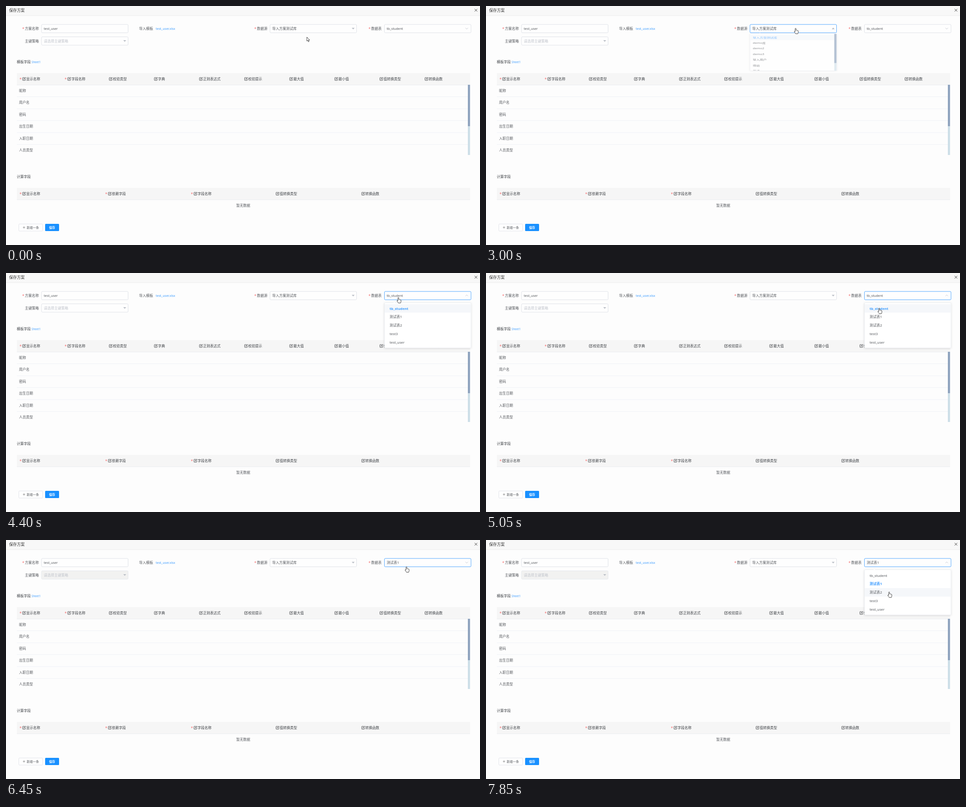
Recreate the animation shown at these times as an HTML page. Size 1054x531 px, loop 8000 ms.

```html
<!DOCTYPE html>
<html lang="zh-CN">
<head>
<meta charset="utf-8">
<style>
  html, body { margin: 0; width: 100%; height: 100%; overflow: hidden; background: #fdfdfd; }
  svg { display: block; width: 100vw; height: 100vh; }
  text { font-family: "Noto Sans", "Noto Sans CJK SC", "Noto Sans CJK", sans-serif; white-space: pre; }
</style>
</head>
<body>
<svg id="stage" viewBox="0 0 1054 531"></svg>
<script>
const LOOP = 8000, BLUE = '#409eff', INK = '#55585d', LINE = '#dcdfe6', MUTED = '#c0c4cc';
const OPEN_SOURCE = 2120, CLOSE_SOURCE = 2977, OPEN_TABLE = 3650, PICK = 5600, REOPEN = 7000;
const ROW = 18.8, POPPER_Y = 66;

// Markup helpers
const text = (x, y, s, { size = 7.75, fill = INK, weight = 400, anchor = 'start', id = '' } = {}) =>
  `<text ${id && `id="${id}"`} x="${x}" y="${y + 2.8}" font-size="${size}" fill="${fill}" font-weight="${weight}" text-anchor="${anchor}">${s}</text>`;
const rect = (x, y, w, h, fill, extra = '') =>
  `<rect x="${x}" y="${y}" width="${w}" height="${h}" fill="${fill}" ${extra}/>`;
const star = (x, y) => text(x, y + 1, '*', { size: 8.5, fill: '#f56c6c' });
const label = (x, y, s, required) => (required ? star(x - 6, y) : '') + text(x, y, s);
const box = (id, x, y) => rect(x, y, 192.5, 18.5, '#fefefe', `id="${id}" rx="2" stroke="${LINE}" stroke-width=".9"`);
const caret = (id, x, y) =>
  `<g transform="translate(${x} ${y})"><path id="${id}" d="M-3.2-1.6H3.2L0 1.9Z" fill="#b9bdc5"/></g>`;
const pencil = (x, y) =>
  `<path transform="translate(${x} ${y})" fill="none" stroke="#404246" stroke-width=".9"
    d="M4.5-3H1.2Q.5-3 .5-2.3V2.6Q.5 3.3 1.2 3.3H6Q6.7 3.3 6.7 2.6V0M3 1L3.3-.5 6.6-3.6 7.5-2.7 4.3.6Z"/>`;

function tableHead(y, step, required, names) {
  return rect(24, y - 13, 1008, 26.4, '#f6f6f6') + rect(24, y + 13, 1008, .7, '#e6e8ee') +
    names.map((name, i) => {
      const starred = i < required, x = 28.5 + step * i + (starred ? 8 : 0);
      return (starred ? star(x - 6.5, y) : '') + pencil(x, y) +
        text(x + 8.6, y, name, { fill: '#3d4045', weight: 500 });
    }).join('');
}

function popper(id, x, height, pad, items, scroll) {
  return `<g id="${id}"><g transform="translate(${x} 0)">
    ${rect(0, 0, 192.5, height, '#fff', 'rx="2" stroke="#e4e7ed" stroke-width=".7" filter="url(#shadow)"')}
    <path d="M18.5 .2L22-3 25.5 .2" fill="#fff" stroke="#e4e7ed" stroke-width=".6"/>
    <svg y="2" width="192.5" height="${height - 3}">
      <g transform="translate(0 -2)">
      ${rect(.4, 3.3, 191.7, ROW, '#f5f7fa', 'class="hover"')}
      ${items.map((s, i) => text(pad, 3.3 + ROW * (i + .5), s)).join('')}</g>
    </svg>
    ${scroll ? rect(187.5, 1, 4.8, height - 1, '#d3e2ea') + rect(187.5, 1, 4.8, 98, '#90a4bf') : ''}
  </g></g>`;
}

const fields = ['昵称', '用户名', '密码', '出生日期', '入职日期', '人员类型'];
const tables = ['tb_student', '测试表1', '测试表2', 'test3', 'test_user'];
const sources = ['导入方案测试库', 'demo库', 'demo2', 'demo3', '导入用户', '场站', '普通', '测试'];

stage.innerHTML = `
  <defs><filter id="shadow" x="-10%" y="-10%" width="120%" height="125%">
    <feDropShadow dx="0" dy="1" stdDeviation="2.5" flood-color="#000" flood-opacity=".12"/></filter></defs>
  ${rect(0, 0, 1054, 531, '#fdfdfd')}
  ${rect(0, 0, 1054, 21, '#f8f8f8')}${rect(0, 21, 1054, .8, '#e9e9e9')}
  ${text(7, 10, '保存方案', { size: 8.6, fill: '#333' })}
  <path d="M1042 6.3l6 6m0-6l-6 6" stroke="#444" fill="none"/>

  ${label(42, 50, '方案名称', true)}${box('name', 79, 41)}${text(84, 50, 'test_user', { size: 7.24 })}
  ${label(42, 78, '主键策略')}${box('strategy', 79, 68.5)}
  ${text(84, 78, '请选择主键策略', { fill: MUTED })}${caret('strategyCaret', 264, 77.5)}
  ${label(296, 50, '导入模板')}${text(333, 50, 'test_user.xlsx', { size: 7, fill: BLUE })}
  ${label(558, 50, '数据源', true)}${box('source', 587, 41)}
  ${text(592, 50, '导入方案测试库')}${caret('sourceCaret', 772, 50)}
  ${label(812, 50, '数据表', true)}${box('table', 841.5, 41)}
  ${text(846.5, 50, '', { id: 'tableValue' })}
  <g transform="translate(1024.5 50)"><path id="tableCaret" d="M-2.8-1.4L0 1.4 2.8-1.4" fill="none" stroke="${MUTED}" stroke-width=".9"/></g>

  ${text(24, 124, '模板字段', { fill: '#3d4045' })}${text(57, 124, 'Sheet1', { size: 6.2, fill: BLUE })}
  ${tableHead(162, 100.3, 2, ['显示名称', '字段名称', '校验类型', '字典', '正则表达式', '校验提示', '最大值', '最小值', '值转换类型', '转换函数'])}
  ${fields.map((s, i) => text(29, 188 + 26.5 * i, s) +
    (i < 5 ? rect(24, 201.3 + 26.5 * i, 1003, .8, '#ebeef5') : '')).join('')}
  ${rect(1027, 175, 4.8, 156, '#cddfe8')}${rect(1027, 175, 4.8, 92, '#90a4bf')}

  ${text(24, 379, '计算字段', { fill: '#3d4045' })}
  ${tableHead(417, 190.5, 3, ['显示名称', '依赖字段', '字段名称', '值转换类型', '转换函数'])}
  ${text(527.5, 443, '暂无数据', { anchor: 'middle' })}
  ${rect(28.5, 484.3, 53, 15.7, '#fefefe', `rx="1.5" stroke="${LINE}" stroke-width=".8"`)}
  <path d="M37.5 492h5m-2.5-2.5v5" stroke="#666" stroke-width=".7"/>
  ${text(46, 492, '新增一条', { size: 6.8 })}
  ${rect(87, 484, 31, 16, '#1890ff', 'rx="1.5"')}
  ${text(102.5, 492, '保存', { size: 6.8, fill: '#fff', weight: 700, anchor: 'middle' })}

  ${popper('sourceList', 587, 125, 6.3, sources, true)}
  ${popper('tableList', 841.5, 100.6, 11.5, tables, false)}
  <g id="cursor" fill="#fff" stroke="#222" stroke-width=".85" stroke-linejoin="round">
    <path id="arrow" d="M0 0V9L2 7.2 3.5 10.5 5 9.9 3.6 6.6H6.2Z"/>
    <path id="hand" d="M-1.1 7.5V.9Q-1.1 0 0 0T1 .9V4.3Q2 3.7 2.8 4.6 3.8 4.1 4.4 5.1 5.8 4.8 5.8 6.2V8.6Q5.8 10 4.8 12.2H0Q-.8 10.4-3 8.1-3.4 6.6-2.1 6.7Z"/>
  </g>`;

const $ = id => document.getElementById(id);
const set = (el, attrs) => { for (const k in attrs) el.setAttribute(k, attrs[k]); };
const clamp = v => Math.max(0, Math.min(1, v));
const smooth = v => v * v * (3 - 2 * v);
const quint = v => 1 - (1 - v) ** 5;

// Pointer stops: time, x, y
const stops = [
  [0, 669, 69], [50, 669, 69], [450, 687, 52], [1100, 687, 52], [1650, 688.5, 49.5],
  [3100, 688.5, 49.5], [3580, 872.5, 54.5], [4700, 872.5, 54.5], [5350, 876, 97],
  [5750, 876, 97], [6350, 890.5, 59.5], [6480, 890.5, 59.5], [6680, 894, 52],
  [7080, 894, 52], [7700, 896.5, 115.5], [LOOP, 896.5, 115.5]
];
function pointer(t) {
  const i = stops.findIndex(s => s[0] > t), [t0, x0, y0] = stops[i - 1], [t1, x1, y1] = stops[i];
  const k = smooth((t - t0) / (t1 - t0));
  return [x0 + (x1 - x0) * k, y0 + (y1 - y0) * k];
}

// Opening and closing state of a drop-down at time t
function fold(t, open, close) {
  const leaving = t >= close;
  const p = clamp((t - (leaving ? close : open)) / 300);
  return {
    leaving,
    scale: leaving ? 1 - quint(p) : quint(p),
    turn: 180 * (leaving ? 1 - smooth(p) : smooth(p))
  };
}

function showList(id, state, selected, hovered) {
  const group = $(id), visible = state.scale > .004;
  group.style.display = visible ? '' : 'none';
  if (!visible) return;
  const y = state.leaving ? 61.4 : POPPER_Y;
  set(group, { transform: `translate(0 ${y}) scale(1 ${state.scale})`, opacity: state.scale });
  set(group.querySelector('.hover'), { y: 3.3 + ROW * hovered });
  group.querySelectorAll('text').forEach((el, i) => set(el, {
    fill: i === selected ? BLUE : INK,
    'font-weight': i === selected && id === 'tableList' ? 700 : 400
  }));
}

function render(t) {
  const [x, y] = pointer(t), picked = t >= PICK;
  const source = fold(t, OPEN_SOURCE, CLOSE_SOURCE);
  const table = t < REOPEN ? fold(t, OPEN_TABLE, PICK) : fold(t, REOPEN, LOOP);
  const onInput = y >= 40 && y <= 60;
  const onSource = onInput && x > 587 && x < 780;
  const onTable = x > 841 && (onInput || table.scale > .1);
  const selected = picked ? 1 : 0, row = Math.floor((y - POPPER_Y - 3.3) / ROW);

  showList('sourceList', source, 0, 0);
  showList('tableList', table, selected, table.leaving || row < 0 ? selected : row);
  set($('sourceCaret'), { transform: `rotate(${source.turn})` });
  set($('tableCaret'), { transform: `rotate(${table.turn})` });

  const border = (focused, over) => focused ? BLUE : over ? MUTED : LINE;
  set($('source'), { stroke: border(t >= OPEN_SOURCE && t < OPEN_TABLE, onSource) });
  set($('table'), { stroke: border(t >= OPEN_TABLE, onTable && onInput) });
  set($('strategy'), { fill: picked ? '#f2f2f1' : '#fefefe', stroke: picked ? '#e4e7ed' : LINE });
  $('tableValue').textContent = tables[selected];
  set($('tableValue'), { 'font-size': picked ? 7.75 : 7.2 });

  set($('cursor'), { transform: `translate(${x} ${y})` });
  const pointing = onSource || onTable;
  $('hand').style.display = pointing ? '' : 'none';
  $('arrow').style.display = pointing ? 'none' : '';
}

function tick() {
  render(performance.now() % LOOP);
  requestAnimationFrame(tick);
}
tick();
</script>
</body>
</html>
```
